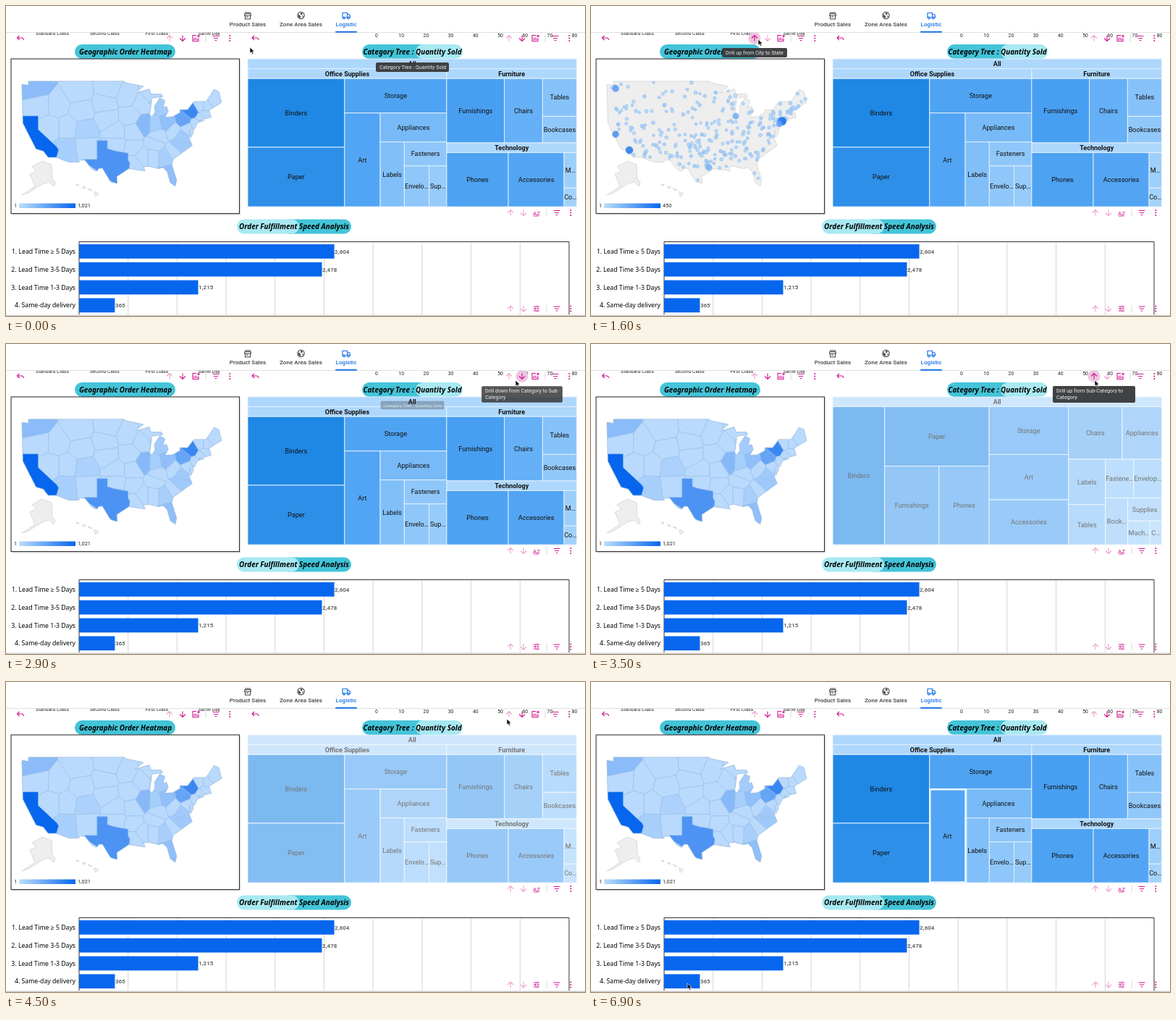
These frames come from a looping animation (800x428 px, 7 s). An HTML page:

```html
<!DOCTYPE html>
<html lang="en">
<head>
<meta charset="utf-8">
<title>Logistic dashboard</title>
<style>
html, body { margin: 0; width: 100%; height: 100%; overflow: hidden; background: #fff; }
svg { display: block; width: 800px; height: 428px; font-family: Roboto, sans-serif; }
.title { font: italic bold 9.9px "Noto Sans", "Open Sans", sans-serif; text-anchor: middle; }
.row { font: 8.7px "Noto Sans", "Open Sans", sans-serif; text-anchor: end; }
.tab { font-size: 8.1px; font-weight: 500; text-anchor: middle; }
.cell { font-size: 9.1px; text-anchor: middle; fill: #111; }
.head { font-size: 9px; font-weight: bold; text-anchor: middle; fill: #111; }
.small { font-size: 6.8px; text-anchor: middle; fill: #222; }
.key { font-size: 7.3px; fill: #222; }
.value { font-size: 8px; font-weight: bold; fill: #666; }
.tip { font-size: 7.2px; fill: #f1f1f1; }
.ico { fill: none; stroke: #d0148c; stroke-width: 1.1; }
</style>
</head>
<body>
<svg id="stage" viewBox="0 0 800 428" xmlns="http://www.w3.org/2000/svg"></svg>
<script>
const LOOP = 7000, BLUE = '#0766ee', PINK = '#d0148c', HEAD = '#aed7fc';
const stage = document.getElementById('stage');
const $ = id => document.getElementById(id);

const rect = (x, y, w, h, fill, more = '') =>
  `<rect x="${x}" y="${y}" width="${w}" height="${h}" fill="${fill}" ${more}/>`;
const text = (x, y, s, cls, more = '') => `<text x="${x}" y="${y}" class="${cls}" ${more}>${s}</text>`;
const line = (d, more = '') => `<path d="${d}" fill="none" ${more}/>`;
const group = (id, body, more = '') => `<g id="${id}" ${more}>${body}</g>`;
const mix = (a, b, k) => `rgb(${a.map((v, i) => Math.round(v + (b[i] - v) * k))})`;

// ---- map: degrees west / north in a Mercator projection
const merc = lat => Math.log(Math.tan(Math.PI / 4 + lat * Math.PI / 360)) * 180 / Math.PI;
const project = (lon, lat) => [22 + (124.7 - lon) * 4.78, 103.7 + (56.4 - merc(lat)) * 4.78];
const points = s => s.trim().split(/\s+/).map(p => project(...p.split(',').map(Number)));
const shape = pts => 'M' + pts.map(p => p.map(v => v.toFixed(1)).join(' ')).join('L') + 'Z';

const north = `124.7,48.4 122.8,48.2 122.8,49 95.2,49 94.6,48.7 89.6,48 92,46.7 87.9,47.5 87.4,46.5 84.4,46.5 84,46
 87,45.7 88,44.6 87.2,45.2 87.8,42.3 87.2,41.7 86.2,42.8 86.4,44 84.8,45.75 83.4,45.2 83.9,43.7 82.9,44 82.4,43
 83.4,41.7 81.2,41.8 79,42.7 79,43.3 76.8,43.3 75,45 71.5,45 70.3,46.2 69.2,47.4 67.8,47 67,44.8 70.6,43.2 `;
const south = `70,41.7 73.7,41 72,41 73.9,40.5 74.9,39 75.5,39.5 75.1,38.4 75.9,37.2 76.2,39 76.3,36.9 75.5,35.3
 77.9,33.9 81,32 81.4,30.7 80,26.8 80.4,25.2 81.8,26.1 82.7,28.9 83.9,30 85.3,29.7 88,30.3 89.6,30.1 89.1,29.1
 93.8,29.7 97.3,27.7 97.2,25.9 99.1,26.4 101.4,29.8 102.4,29.8 103.1,29 104.5,29.6 106.5,31.8 108.2,31.8 108.2,31.3
 111.1,31.3 114.8,32.5 117.1,32.5 118.5,34 120.6,34.5 122.5,37.5 124.4,40.4 124.5,42.9`;
const land = shape(points(north + south));

// state centres; each state is the area nearest to its centre
const centres = points(`120.5,47.6 119.5,44.3 114.5,44.2 116.5,39.5 111.5,39.5 111.7,34.5 108.5,47 107.5,43 106.5,39
 106.3,35 99.5,47.6 100.5,44.4 100,41.6 97.5,38.4 97.5,35.6 94.2,46 93.5,42 92.5,38.4 92.4,34.8 92.4,31 89.9,44.6
 89.2,40 84.8,44 86.2,39.9 82.8,40.4 85.3,37.6 86.3,35.6 89.7,32.7 86.8,32.8 83.4,32.7 82,28.3 80.9,33.9 79.2,35.4
 78.6,37.5 80.7,38.7 77.7,40.9 75.5,42.9 76.8,39.3 74.5,40.1 72.7,41.6 71.8,42.3 72.9,44 71.6,44 69.2,45.3 87.5,46.3`);
const orders = { 0: .28, 5: .12, 8: .1, 21: .3, 22: .15, 23: .13, 24: .25, 29: .12, 30: .25, 32: .17, 33: .16, 35: .48, 36: .72 };
const california = points('125,42 120,42 120,39 114.6,35 114.1,34.3 114.7,32.5 117.5,32 125,36');
const texas = points('106.6,32 103,32 103,36.5 100,36.5 100,34.6 98,34.1 94,33.5 94,31.9 93.5,31 93.8,29 97,25 101,28 107,31.5');

// keep the part of a polygon that is nearer to a than to b
function nearer(poly, a, b) {
  const side = p => (p[0] - b[0]) ** 2 + (p[1] - b[1]) ** 2 - (p[0] - a[0]) ** 2 - (p[1] - a[1]) ** 2;
  return poly.flatMap((p, i) => {
    const q = poly[(i + 1) % poly.length], u = side(p), v = side(q), k = u / (u - v);
    const cut = u * v < 0 ? [[p[0] + (q[0] - p[0]) * k, p[1] + (q[1] - p[1]) * k]] : [];
    return u >= 0 ? [p, ...cut] : cut;
  });
}
const frame = [[10, 90], [310, 90], [310, 260], [10, 260]];
const thin = 'stroke="#94bce4" stroke-width=".6" stroke-linejoin="round"';
const state = (pts, k) => `<path d="${shape(pts)}" fill="${mix([190, 221, 253], [7, 102, 238], k)}" ${thin}/>`;
const states = centres.map((c, i) =>
  state(centres.reduce((poly, o) => o === c ? poly : nearer(poly, c, o), frame), orders[i] || .03)).join('') +
  state(california, 1) + state(texas, .62);

const grey = 'fill="#eeeeee" stroke="#cfcfcf" stroke-width=".7"';
const alaska = 'M36 222L50 214 63 219 64 238 68 244 66 249 60 243 50 246 31 258 22 261 40 249 33 232 42 228Z';
const hawaii = 'M97 246h3l1 2-3 0ZM106 249l4 1-1 2-3-1ZM113 252l4 1 2 2-4-1ZM122 256l6 3-4 4-2-3Z';
const hubs = [[264, 159, 6, .95], [260, 163, 4, .5], [34, 114, 4.6, .55], [53, 199, 5.2, .85],
  [34, 177, 4.6, .65], [200, 152, 4.2, .4], [163, 223, 4.2, .35]];
const dot = ([x, y, r, k]) => `<circle cx="${x.toFixed(1)}" cy="${y.toFixed(1)}" r="${r}" ` +
  `fill="${mix([180, 216, 252], [7, 102, 238], k)}" fill-opacity=".85" stroke="#7fb2e6" stroke-width=".5"/>`;

// ---- tree map: halve the list by quantity, cutting across the longer side
const sold = {
  'Office Supplies': { Binders: 5974, Paper: 5178, Storage: 3158, Art: 3000, Appliances: 1729, Labels: 1400,
    Fasteners: 914, Envelopes: 906, Supplies: 647 },
  Furniture: { Furnishings: 3563, Chairs: 2356, Tables: 1241, Bookcases: 868 },
  Technology: { Phones: 3289, Accessories: 2976, Machines: 440, Copiers: 234 }
};
const total = list => list.reduce((s, [, n]) => s + n, 0);
function layout(list, x, y, w, h) {
  if (list.length === 1) return [{ name: list[0][0], n: list[0][1], x, y, w, h }];
  const sum = total(list);
  let cut = 1;
  while (total(list.slice(0, cut + 1)) <= sum / 2) cut++;
  const a = list.slice(0, cut), b = list.slice(cut), k = total(a) / sum;
  return w > h
    ? [...layout(a, x, y, w * k, h), ...layout(b, x + w * k, y, w * (1 - k), h)]
    : [...layout(a, x, y, w, h * k), ...layout(b, x, y + h * k, w, h * (1 - k))];
}
const pen = document.createElement('canvas').getContext('2d');
pen.font = '9.1px Roboto, sans-serif';
function crop(s, w) {
  const fits = v => pen.measureText(v).width <= w + .3;
  if (fits(s)) return s;
  while (s.length > 1 && !fits(s + '…')) s = s.slice(0, -1);
  return s + '…';
}
const tint = n => n < 3000 ? mix([170, 214, 252], [82, 165, 244], n / 3000) : mix([82, 165, 244], [31, 135, 228], (n - 3000) / 2974);
const box = (x, y, w, h, fill, s, cls) =>
  rect(x, y, w, h, fill, 'stroke="#e6f2fe" stroke-width=".9"') + text(x + w / 2, y + h / 2 + 3.2, s, cls);
const tile = c => box(c.x, c.y, c.w, c.h, tint(c.n), crop(c.name, c.w), 'cell');
const BAND = 13.6, area = [334, 73 + BAND, 454.5, 190.5];
const all = box(334, 73, 454.5, BAND, HEAD, 'All', 'head');

const kinds = layout(Object.entries(sold).map(([k, v]) => [k, total(Object.entries(v))]), ...area);
const products = kinds.flatMap(c => layout(Object.entries(sold[c.name]), c.x, c.y + BAND, c.w, c.h - BAND));
const flat = Object.values(sold).flatMap(Object.entries).sort((a, b) => b[1] - a[1]);
const art = products.find(c => c.name === 'Art');
const byCategory = all + kinds.map(c => box(c.x, c.y, c.w, BAND, HEAD, c.name, 'head')).join('') +
  products.map(tile).join('') + rect(art.x + .5, art.y + .5, art.w + .5, art.h - 1, 'none', 'id="art" stroke="#e9f4ff" stroke-width="2.6"');
const bySub = all + layout(flat, ...area).map(tile).join('');

// ---- icons
const at = (x, y, body, id = '') => `<g ${id && `id="${id}"`} class="ico" transform="translate(${x} ${y})">${body}</g>`;
const arrow = up => `<path d="M0 4V-4M-4 0L0 -4 4 0" ${up ? '' : 'transform="rotate(180)"'}/>`;
const undo = '<path d="M-4.5 0H2Q4.5 .5 4.5 3M-1.5 -3L-4.5 0 -1.5 3"/>';
const filter = '<path d="M-4.5 -3H4.5M-3 0H3M-1.3 3H1.3"/>';
const dots = [-3.5, 0, 3.5].map(y => `<circle cy="${y}" r="1.05" fill="${PINK}" stroke="none"/>`).join('');
const chart = '<path d="M1 -4H-4V4H4V0M-2 2.5V0M0 2.5V-1M2 2.5V.5M4 -5V-1M2 -3H6"/>';
const sliders = '<path d="M-4 -3H0M2 -3H4M1 -4.5V-1.5M-4 0H-2M0 0H4M-1.5 -1.5V1.5M-4 3H0M2 3H4M1 1.5V4.5"/>';
const sort = `<text x="-5" y="3" font-size="8" fill="${PINK}" stroke="none">AZ</text><path d="M-4 4.5H3" stroke-width=".8"/>`;
const toolbar = (key, x, y, third) =>
  `<circle id="${key}Halo" cy="${y}" r="8.5" fill="#edc6e1"/>` +
  at(x, y, arrow(true), key + 'Up') + at(x + 18, y, arrow(false), key + 'Down') + at(x + 36, y, third) +
  line(`M${x + 50} ${y - 5}v10`, 'stroke="#ccc" stroke-width=".8"') + at(x + 64, y, filter) + at(x + 83.3, y, dots);
const pill = (x, y, w, fill) => rect(x, y, w, 20, fill, 'rx="10"');

const tips = [
  { x: 511, y: 78, w: 101, s: ['Category Tree : Quantity Sold'], on: -300, off: 150 },
  { x: 192, y: 58, w: 104, s: ['Drill down from State to City'], on: 550, off: 1250 },
  { x: 181, y: 58, w: 90, s: ['Drill up from City to State'], on: 1400, off: 1900 },
  { x: 511, y: 78, w: 101, s: ['Category Tree : Quantity Sold'], on: 2500, off: 2810 },
  { x: 656, y: 58, w: 114, s: ['Drill down from Category to Sub-', 'Category'], on: 2780, off: 3270 },
  { x: 638, y: 58, w: 114, s: ['Drill up from Sub-Category to', 'Category'], on: 3330, off: 4200 }];
const tip = (o, i) => {
  o.h = o.s.length > 1 ? 23 : 13;
  return group('tip' + i, rect(o.x, o.y, o.w, o.h, '#3a3b3d', 'rx="2"') +
    o.s.map((s, n) => text(o.x + 5, o.y + 9.3 + n * 9, s, 'tip')).join(''));
};

const bars = { '1. Lead Time ≥ 5 Days': 2604, '2. Lead Time 3-5 Days': 2478, '3. Lead Time 1-3 Days': 1215, '4. Same-day delivery': 365 };
const barChart = Array.from({ length: 9 }, (_, i) =>
    line(`M${101 + (i + 1) * 67.7} 326V426`, 'stroke="#d2d2d2" stroke-width=".9"')).join('') +
  line('M101 426V325.5H778V426', 'stroke="#333" stroke-width="1"') +
  Object.entries(bars).map(([s, n], i) => {
    const y = 329 + i * 24.8, w = n * .1354;
    return rect(101, y, w, 19.7, BLUE) + text(96, y + 13, s, 'row') +
      text(101.5 + w, y + 12.8, n.toLocaleString('en-US'), 'value');
  }).join('') + rect(0, 426.6, 800, 1.4, '#c9c9c9');

const tabs = '<g fill="none" stroke="#444" stroke-width="1.1">' +
  '<path d="M330 9H338M330 10.5L329.5 13H338.5L338 10.5ZM330.5 13V18H337.5V13M332 15h3"/>' +
  '<circle cx="407.5" cy="13" r="4.7"/><path fill="#444" d="M404 11l3 3v3l-3-2ZM407 9l3 1-1 2-2 0ZM409 13l2 1-1 2Z" stroke="none"/></g>' +
  '<g fill="none" stroke="#1a73e8" stroke-width="1.2"><path d="M465 9.5H471.5V16H465ZM471.5 11.5H474L475.5 13.5V16H471.5"/>' +
  '<circle cx="467" cy="16.5" r="1.3" fill="#fff"/><circle cx="473" cy="16.5" r="1.3" fill="#fff"/></g>' +
  text(334, 28, 'Product Sales', 'tab', 'fill="#444"') + text(407.5, 28, 'Zone Area Sales', 'tab', 'fill="#444"') +
  text(470, 28, 'Logistic', 'tab', 'fill="#1a73e8"') + rect(455, 34.8, 30, 2, '#1a73e8', 'rx="1"');
const legend = n => text(99, 278.3, n, 'key');

stage.innerHTML =
  `<defs><clipPath id="coast"><path d="${land}"/></clipPath>
   <linearGradient id="ramp"><stop stop-color="#bbdefb"/><stop offset="1" stop-color="${BLUE}"/></linearGradient></defs>` +
  rect(0, 0, 800, 428, '#fff') +
  ['Standard Class', 'Second Class', 'First Class', 'Same Day'].map((s, i) => text(64 + i * 72.2, 39.8, s, 'small')).join('') +
  Array.from({ length: 9 }, (_, i) => text(512 + i * 34.2, 42.5, i * 10, 'small')).join('') +
  at(20, 44, undo) + at(344.5, 44, undo) +
  toolbar('map', 226, 44.5, chart) + toolbar('tree', 695, 44.5, chart) + toolbar('sort', 697, 285.5, sort) +
  rect(0, 0, 800, 36, '#fff') + rect(0, 36, 800, .9, '#dcdcdc') + tabs +
  pill(95, 53, 139, '#43c4d8') + text(165, 66.8, 'Geographic Order Heatmap', 'title') +
  pill(492, 53, 110, '#43c4d8') + pill(566, 53, 65, '#a8e9f2') + text(561.5, 66.8, 'Category Tree : Quantity Sold', 'title') +
  pill(380, 294.5, 97, '#43c4d8') + pill(319, 294.5, 86, '#a8e9f2') + text(398, 308, 'Order Fulfillment Speed Analysis', 'title') +
  rect(8, 74.5, 316, 214, '#d9d9d9') + rect(7, 73, 315.5, 213.5, '#fff', 'stroke="#333" stroke-width="1.1"') +
  group('map',
    `<path d="${alaska + hawaii}" ${grey}/><path id="land" d="${land}" ${grey}/>` +
    group('states', `<g clip-path="url(#coast)">${states}</g>` + line(land, thin) + legend('1,021')) +
    group('cities', '') +
    rect(18, 272.5, 78, 6.5, 'url(#ramp)') + text(11, 278.3, '1', 'key')) +
  group('tree', group('cats', byCategory) + group('subs', bySub)) +
  barChart + toolbar('bars', 697, 418, sliders) +
  tips.map(tip).join('') +
  '<path id="cursor" d="M0 0V8.2L2 6.5 3.4 9.5 4.9 8.8 3.5 5.9H6.2Z" fill="#000" stroke="#fff" stroke-width=".7"/>';

// seeded scatter around the state centres, kept on land
let seed = 11;
const rnd = () => (seed = seed * 16807 % 2147483647) / 2147483647;
const onLand = ([x, y]) => {
  const p = stage.createSVGPoint();
  p.x = x;
  p.y = y;
  return $('land').isPointInFill(p);
};
const scatter = [...centres, ...california, ...texas].flatMap(([x, y]) =>
  Array.from({ length: 5 }, () => [x + (rnd() - .5) * 26, y + (rnd() - .5) * 26, 1.8 + rnd() * .7, rnd() * .12])).filter(onLand);
$('cities').innerHTML = [...scatter, ...hubs].map(dot).join('') + legend('450');

// ---- motion
const clamp = v => Math.max(0, Math.min(1, v));
const ease = v => v * v * (3 - 2 * v);
const ramp = (t, a, d) => ease(clamp((t - a) / d));
const within = (t, a, b) => t >= a && t < b;
const dim = (t, a, b) => .42 * ramp(t, a, 120) * (1 - ramp(t, b, 120));
const route = [[0, 337, 57], [480, 246, 47], [1150, 246, 47], [1400, 231, 46], [1850, 231, 46], [2500, 563, 63],
  [2900, 704, 50], [3050, 711, 46], [3250, 711, 46], [3450, 696, 50], [4150, 696, 50], [4500, 692, 51],
  [5000, 497, 215], [5500, 332, 357], [5700, 332, 357], [6800, 133, 416], [LOOP, 133, 416]];
const show = (id, on) => $(id).setAttribute('display', on ? 'inline' : 'none');
const fade = (id, v) => $(id).setAttribute('opacity', v);

function tools(key, drilled, x) {
  fade(key + 'Up', drilled ? 1 : .4);
  fade(key + 'Down', drilled ? .4 : 1);
  show(key + 'Halo', x > 0);
  $(key + 'Halo').setAttribute('cx', x);
}

function draw(t) {
  const city = within(t, 1020, 2000), sub = within(t, 3300, 4350);
  show('states', !city);
  show('cities', city);
  fade('map', 1 - dim(t, 850, 1150) - dim(t, 1800, 2150));
  show('cats', !sub);
  show('subs', sub);
  fade('tree', 1 - dim(t, 3080, 3600) - dim(t, 4150, 4700));
  show('art', t >= 4930);
  tools('map', city, within(t, 450, 1250) ? 244 : within(t, 1300, 1950) ? 226 : 0);
  tools('tree', sub, within(t, 2850, 3330) ? 713 : within(t, 3380, 4300) ? 695 : 0);

  tips.forEach((o, i) => {
    const v = ramp(t, o.on, 150) * (1 - ramp(t, o.off, 150));
    const k = .8 + .2 * v, cx = o.x + o.w / 2, cy = o.y + o.h / 2;
    fade('tip' + i, v * .96);
    $('tip' + i).setAttribute('transform', `translate(${cx} ${cy}) scale(${k}) translate(${-cx} ${-cy})`);
  });

  const n = Math.max(1, route.findIndex(p => p[0] > t));
  const [a, x, y] = route[n - 1], [b, u, w] = route[n], e = ramp(t, a, b - a);
  $('cursor').setAttribute('transform', `translate(${x + (u - x) * e} ${y + (w - y) * e})`);
}

['sort', 'bars'].forEach(k => { tools(k, false, 0); fade(k + 'Down', .4); });
const start = performance.now();
function tick() {
  draw((performance.now() - start) % LOOP);
  requestAnimationFrame(tick);
}
tick();
</script>
</body>
</html>
```
